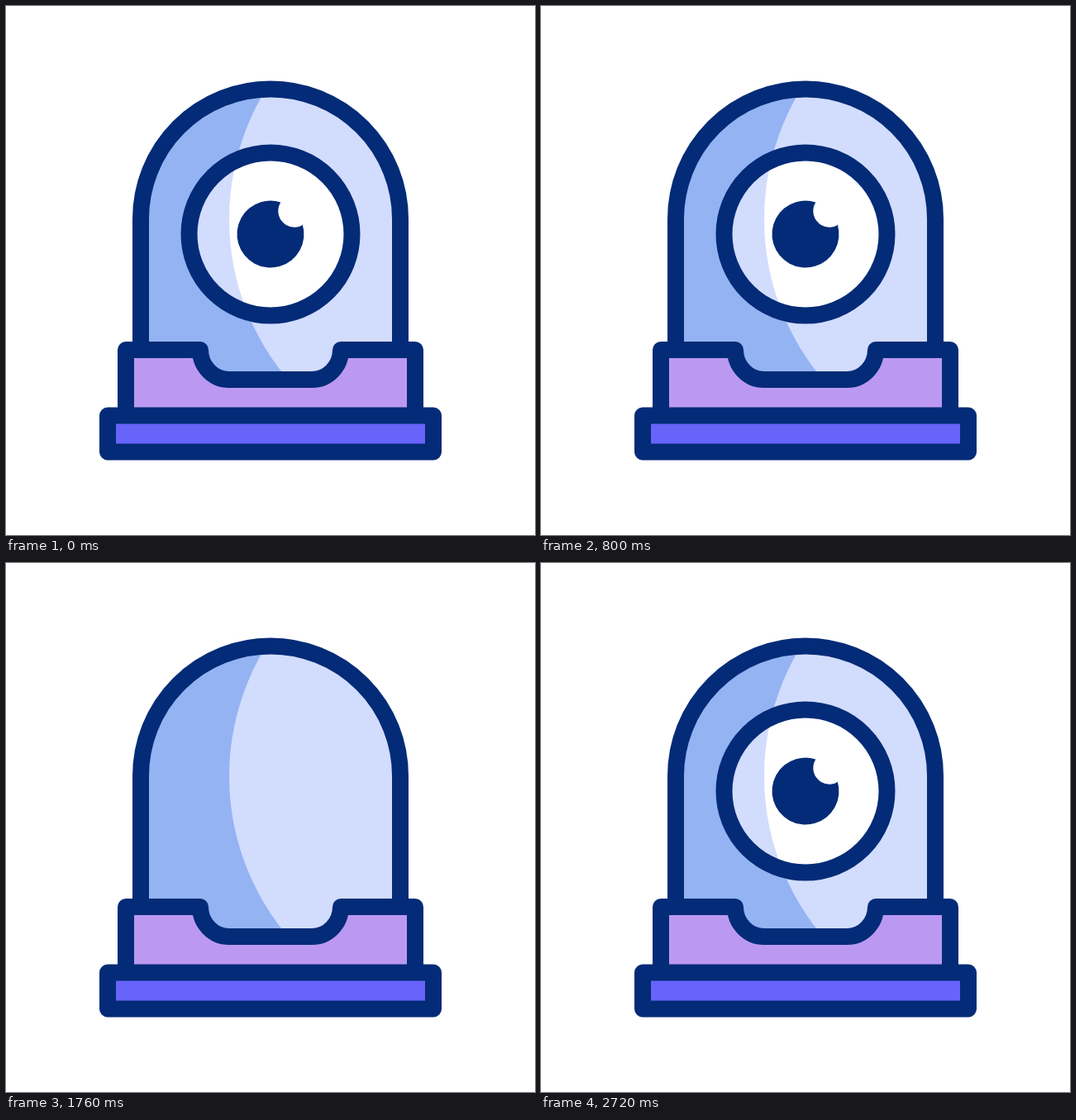
Animation of 640 by 640 pixels, one loop 2800 ms. Source, as an HTML page with a canvas:

```html
<!DOCTYPE html>
<html lang="en">
<head>
<meta charset="utf-8">
<title>Siren eye</title>
<style>
  html, body { margin: 0; width: 100%; height: 100%; overflow: hidden; background: #fff; }
  canvas { display: block; width: 640px; height: 640px; }
</style>
</head>
<body>
<canvas id="stage" width="640" height="640"></canvas>
<script>
const ctx = document.getElementById('stage').getContext('2d');
const LOOP = 2800, STEP = 40, PULSE = LOOP / 3;
const NAVY = '#032b77', SHADE = '#94b3f3', LIGHT = '#d2dcfd', WHITE = '#fff',
      LILAC = '#bb99f2', VIOLET = '#6863f9', YELLOW = '#ffcb51';

const dome = new Path2D('M163 452V257.5A157 157 0 0 1 477 257.5V452');
const collar = new Path2D('M145 496V416H235A35 36 0 0 0 270 452H370A35 36 0 0 0 405 416H495V496Z');
const foot = new Path2D('M123 495.5H517V539.5H123Z');
const litSide = new Path2D();
litSide.arc(570, 258, 300, 0, 7);

// Pupil around its own centre, with a round bite for the glint
const pupil = new Path2D();
pupil.arc(0, 0, 40.5, -0.29, -1.265);
pupil.arc(29, -28, 19.7, -2.61, 0.968, true);
pupil.closePath();

// The same two arcs on both sides, scaled about a fixed point
const waves = new Path2D('M26.5 -84A109.9 109.9 0 0 1 26.5 70M-20 -38A43.5 43.5 0 0 1 -20 24');

const clamp = v => Math.min(1, Math.max(0, v));
const ramp = (t, from, to) => clamp((t - from) / (to - from));

function fillStroke(path, color) {
  ctx.fillStyle = color;
  ctx.fill(path);
  ctx.stroke(path);
}

function drawWaves(t) {
  const phase = t % PULSE;
  const scale = 1.017 - 1.14e-6 * (790 - phase) ** 2;
  ctx.save();
  ctx.globalAlpha = ramp(phase, 95, 283) * (1 - ramp(phase, 690, 790));
  ctx.strokeStyle = YELLOW;
  for (const [x, side] of [[537, 1], [87, -1]]) {
    const path = new Path2D();
    path.addPath(waves, new DOMMatrix([side * scale, 0, 0, scale, x, 292]));
    ctx.stroke(path);
  }
  ctx.restore();
}

// Two turns to the left, slowing down; the eye re-enters on the right
function eyeOffset(t) {
  const width = 572, p = ramp(t, 880, 2720);
  const turned = 1 - (1 - p) ** 2 + 0.005 * Math.sin(2 * Math.PI * p);
  const travel = 2 * width * turned;
  return Math.round(travel / width) * width - travel;
}

function drawEye(t) {
  const dx = eyeOffset(t);
  const blink = Math.sin(Math.PI * ramp(t, 0, 490)) ** 2;
  const ball = new Path2D();
  ball.ellipse(320 + dx, 276, 98.5, 98.5 * (1 - 0.97 * blink), 0, 0, 2 * Math.PI);

  ctx.save();
  ctx.clip(ball);
  ctx.fillStyle = LIGHT;
  ctx.fill(ball);
  ctx.fillStyle = WHITE;
  ctx.fill(litSide);
  ctx.translate(320 + dx * 1.12, 276);
  ctx.fillStyle = NAVY;
  ctx.fill(pupil);
  ctx.restore();
  ctx.stroke(ball);
}

function draw(t) {
  ctx.fillStyle = WHITE;
  ctx.fillRect(0, 0, 640, 640);
  ctx.lineWidth = 20;
  ctx.lineCap = ctx.lineJoin = 'round';
  ctx.strokeStyle = NAVY;

  drawWaves(t);

  ctx.save();
  ctx.clip(dome);
  ctx.fillStyle = SHADE;
  ctx.fill(dome);
  ctx.fillStyle = LIGHT;
  ctx.fill(litSide);
  drawEye(t);
  ctx.restore();

  ctx.stroke(dome);
  fillStroke(collar, LILAC);
  fillStroke(foot, VIOLET);
}

const start = performance.now();
function frame() {
  const t = (performance.now() - start) % LOOP;
  draw(Math.floor(t / STEP) * STEP);
  requestAnimationFrame(frame);
}
frame();
</script>
</body>
</html>
```
